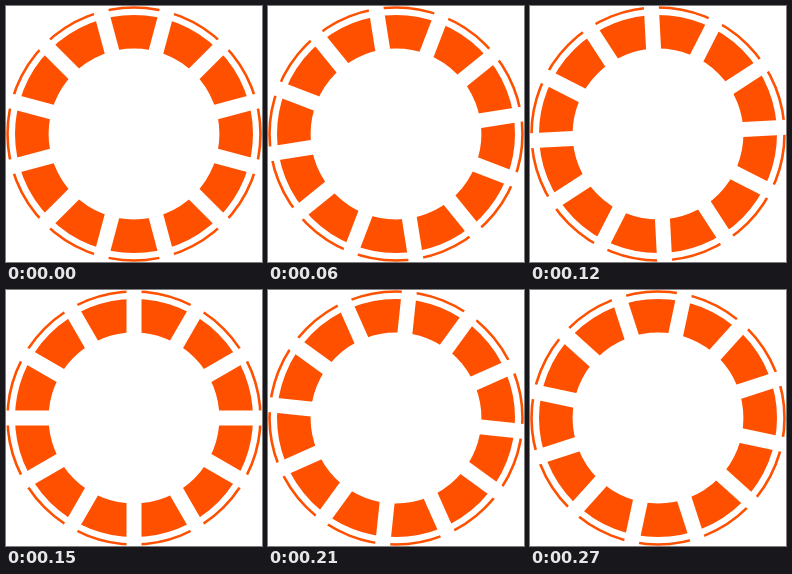
An HTML page that plays this animation: 256x256 px, repeating every 0.3 s.

```html
<!DOCTYPE html>
<html lang="en">
<head>
<meta charset="utf-8">
<title>Spinning ring</title>
<style>
  html, body { margin: 0; height: 100%; overflow: hidden; background: #fff; }
  svg { display: block; width: 100vw; height: 100vh; }
</style>
</head>
<body>
<svg viewBox="-128 -128 256 256" fill="none" stroke="#ff5000">
  <circle r="126.5" stroke-width="2.6"/>
  <circle r="102.2" stroke-width="33.6"/>
  <g id="gaps" stroke="#fff" stroke-width="15"></g>
</svg>
<script>
  const SEGMENTS = 12, STEPS = 10, STEP_MS = 30;
  const pitch = 360 / SEGMENTS;
  const gaps = document.getElementById('gaps');

  // Each line crosses the whole ring, cutting two opposite gaps.
  for (let i = 0; i < SEGMENTS / 2; i++) {
    gaps.innerHTML += `<path d="M0-140V140" transform="rotate(${(i + 0.5) * pitch})"/>`;
  }

  function draw() {
    const step = Math.floor(performance.now() / STEP_MS) % STEPS;
    gaps.setAttribute('transform', `rotate(${step * pitch / STEPS})`);
    requestAnimationFrame(draw);
  }
  draw();
</script>
</body>
</html>
```
